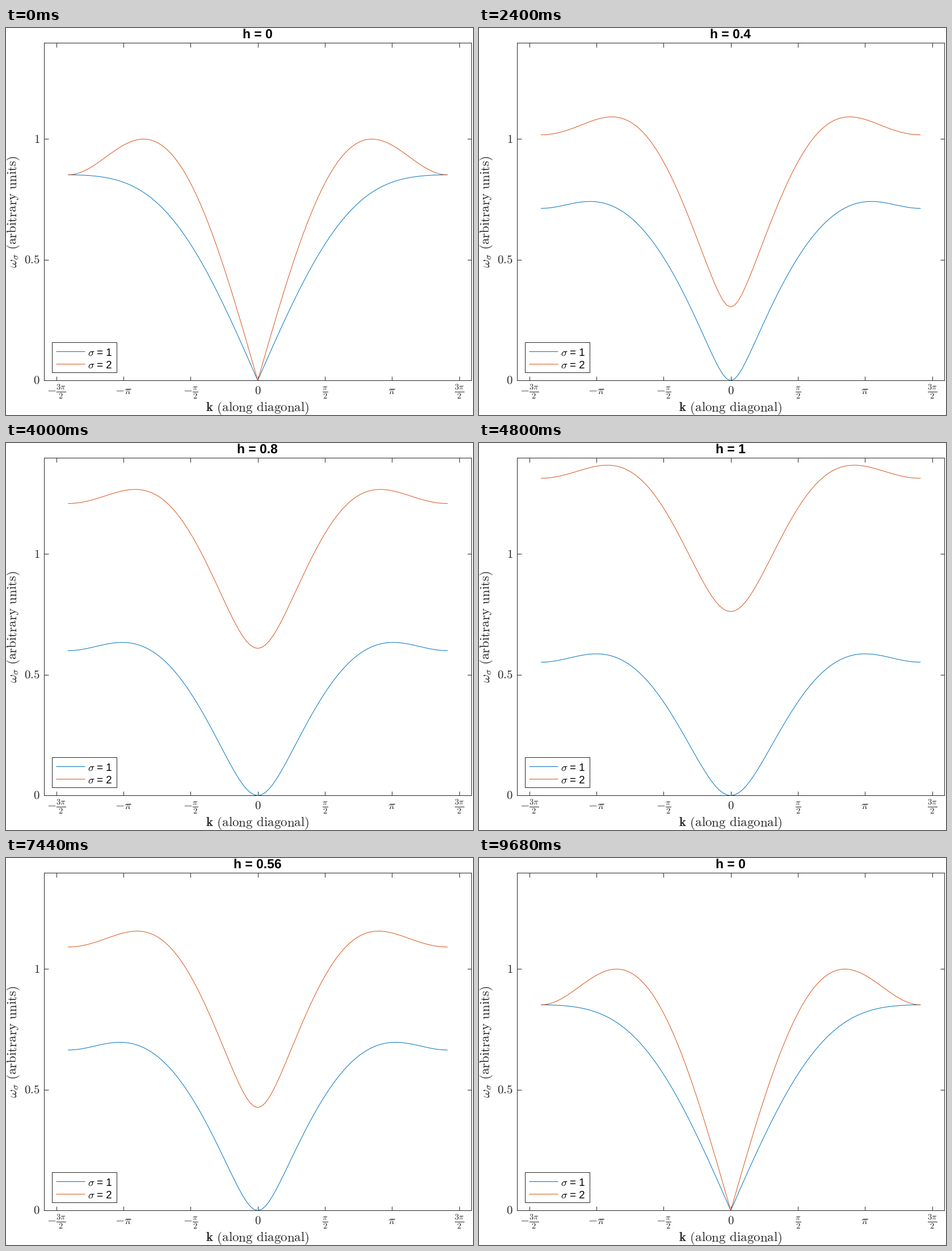
Animation, 823 px wide and 681 px high, one loop 9760 ms. Source, as a matplotlib script:

```python
import numpy as np
import matplotlib.pyplot as plt
from matplotlib.animation import FuncAnimation
from matplotlib.patches import Rectangle

plt.rcParams.update({
    "mathtext.fontset": "cm",
    "font.family": "Liberation Sans",
    "text.hinting": "none",
})

# At 72 dpi one point is one pixel.
W, H, DPI = 823, 681, 72
LEFT, RIGHT, TOP, BOTTOM = 67.1, 820.2, 25.55, 620.3
INK = "#262626"
BLUE, ORANGE = "#0072BD", "#D95319"
TICK, LABEL, KEY = 20.83, 22.92, 18.75
GAP = r"\hspace{0.38}"

STEPS = 50
HOLD_LOW, HOLD_HIGH = 10, 11
FRAMES, INTERVAL = 122, 80

K_LONG, K_TRANS = 1.0, 0.25
OMEGA_MAX = 2.625

fig = plt.figure(figsize=(W / DPI, H / DPI), dpi=DPI, facecolor="white")
ax = fig.add_axes([LEFT / W, 1 - BOTTOM / H, (RIGHT - LEFT) / W, (BOTTOM - TOP) / H])
ax.set_xlim(-5, 5)
ax.set_ylim(0, 1.4)


def put(x, y, text, size, color=INK, ha="center", **style):
    """Write text with its baseline at a pixel position from the top left."""
    return fig.text(x / W, 1 - y / H, text, fontsize=size, color=color,
                    ha=ha, va="baseline", **style)


def bands(q, h):
    """Both phonon branches on the diagonal of a square lattice in a field h."""
    near = 2 * (K_LONG + K_TRANS) * (1 - np.cos(q))
    far = 2 * (1 - np.cos(2 * q))
    a, b = near + K_TRANS * far, near + K_LONG * far
    total = a + b + 4 * h * h
    root = np.sqrt(np.maximum(total ** 2 - 4 * a * b, 0))
    low = np.sqrt(np.maximum(total - root, 0) / 2)
    high = np.sqrt((total + root) / 2)
    return low / OMEGA_MAX, high / OMEGA_MAX


# Frame and ticks
for spine in ax.spines.values():
    spine.set(linewidth=1, edgecolor=INK)
ax.set_xticks(np.arange(-3, 4) * np.pi / 2)
ax.set_yticks([0, 0.5, 1])
ax.tick_params(direction="in", top=True, right=True, length=7.5, width=1,
               color=INK, labelbottom=False, labelleft=False)

x_names = [r"-\frac{3\pi}{2}", r"-\pi", r"-\frac{\pi}{2}", "0",
           r"\frac{\pi}{2}", r"\pi", r"\frac{3\pi}{2}"]
for i, name in enumerate(x_names):
    x = (LEFT + RIGHT) / 2 + (i - 3) * np.pi / 2 * (RIGHT - LEFT) / 10
    put(x, 645, f"${name}$", TICK)
for value in (0, 0.5, 1):
    y = BOTTOM - value * (BOTTOM - TOP) / 1.4
    put(59.5, y + 6.7, rf"$\mathrm{{{value}}}$", TICK, ha="right")

# Axis labels and title
put(443.5, 674, rf"$\mathbf{{k}}{GAP}\mathrm{{(along}}{GAP}\mathrm{{diagonal)}}$", LABEL)
put(18, 323, rf"$\omega_\sigma{GAP}\mathrm{{(arbitrary}}{GAP}\mathrm{{units)}}$", LABEL,
    rotation=90, rotation_mode="anchor")
title = put(443, 18, "h = 0", LABEL, "black", weight="bold")

# Curves
q = np.linspace(-np.pi, np.pi, 101)
curves = [ax.plot(q * np.sqrt(2), 0 * q, color=c, lw=1, clip_on=False, zorder=3,
                  solid_capstyle="butt")[0]
          for c in (BLUE, ORANGE)]

# Legend
key = fig.add_axes([0, 0, 1, 1])
key.set_xlim(0, W)
key.set_ylim(H, 0)
key.axis("off")
key.add_patch(Rectangle((81.3, 553), 114, 53, facecolor="white", edgecolor=INK, lw=1))
for row, color in enumerate((BLUE, ORANGE)):
    y = 568.75 + 22.5 * row
    key.plot([88.5, 139.5], [y, y], color=color, lw=1, solid_capstyle="butt")
    put(144.3, y + 8, r"$\sigma$", KEY, "black", ha="left")
    put(160.5, y + 8, f"= {row + 1}", KEY, "black", ha="left")


def update(frame):
    up = np.clip(frame - HOLD_LOW, 0, STEPS)
    down = np.clip(frame - HOLD_LOW - STEPS - HOLD_HIGH, 0, STEPS)
    h = (up - down) / STEPS
    for curve, omega in zip(curves, bands(q, h)):
        curve.set_ydata(omega)
    title.set_text(f"h = {h:g}")
    return [*curves, title]


anim = FuncAnimation(fig, update, frames=FRAMES, interval=INTERVAL,
                     repeat=True, repeat_delay=0, blit=False)
plt.show()
```
